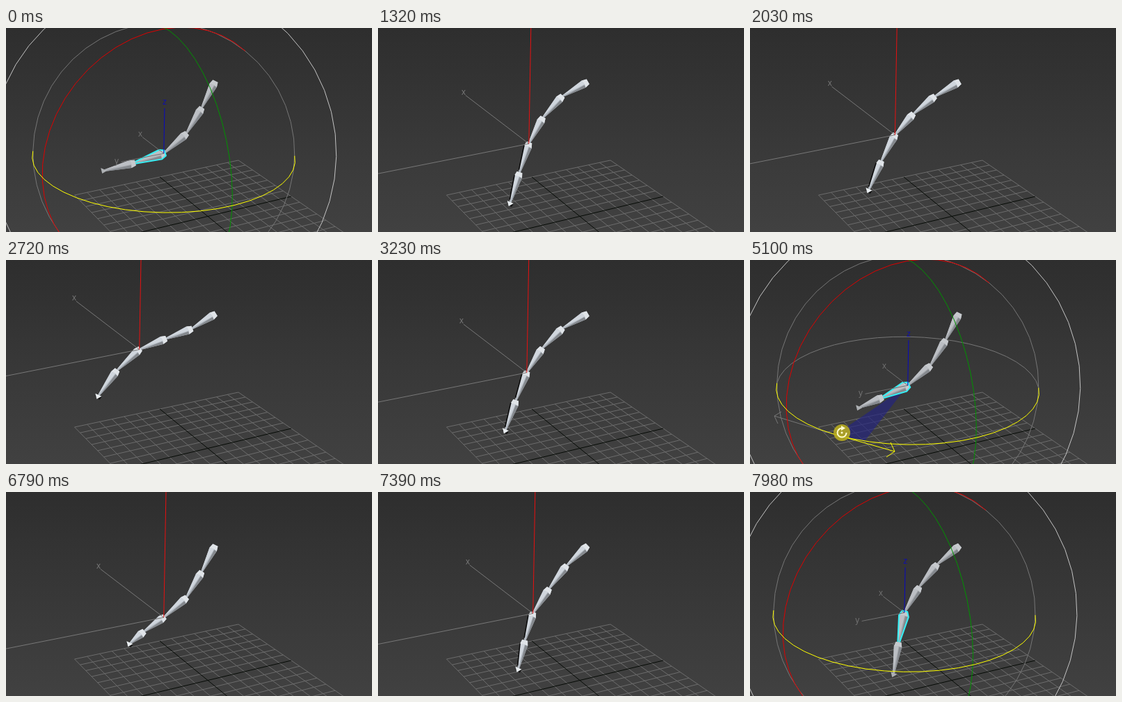
Animation of 526 by 293 pixels, one loop 8000 ms. Source, as an HTML page with a canvas:

```html
<!DOCTYPE html>
<html lang="en">
<head>
<meta charset="utf-8">
<title>Bone chain</title>
<style>
html, body { margin: 0; width: 100%; height: 100%; overflow: hidden; background: #363636; }
canvas { display: block; width: 526px; height: 293px; }
</style>
</head>
<body>
<canvas id="stage" width="526" height="293"></canvas>
<script>
const ctx = document.getElementById('stage').getContext('2d');
const W = 526, H = 293, LOOP = 8000;
const RAD = Math.PI / 180;

const mix = (a, b, k) => Array.isArray(a) ? a.map((v, i) => mix(v, b[i], k)) : a + (b - a) * k;
const within = (t, a, b) => t >= a && t < b;

function sample(steps, t) {
  let i = 0;
  while (i < steps.length - 2 && t >= steps[i + 1][0]) i++;
  const [t0, a] = steps[i], [t1, b] = steps[i + 1];
  return mix(a, b, Math.min(1, Math.max(0, (t - t0) / (t1 - t0))));
}

// Camera: x to the right, y down, depth towards the viewer.
const SIN = 0.408, COS = 0.913, DISTANCE = 1770, ROLL = 0.018;
const level = deg => [Math.cos(deg * RAD), Math.sin(deg * RAD) * SIN, Math.sin(deg * RAD) * COS];
const AXIS = { x: level(241), y: level(152), z: [0, -COS, SIN] };
const RIGHT = [1, 0, 0], DOWN = [0, 1, 0], FRONT = level(90);

function project([ox, oy], [x, y, depth], radius) {
  const scale = radius * DISTANCE / (DISTANCE - depth * radius);
  return [ox + (x - ROLL * y) * scale, oy + (y + ROLL * x) * scale];
}

// Joints run from the fixed root to the tip; the fourth one carries the gizmo.
const ROOT = [300, 78], TAIL = 45, PIVOT = 3;
function chain(reach, ...bearings) {
  const joints = [ROOT];
  bearings.forEach((deg, i) => {
    const [x, y] = joints[i], len = i < PIVOT ? reach : TAIL;
    joints.push([x + len * Math.cos(deg * RAD), y + len * Math.sin(deg * RAD)]);
  });
  return joints;
}

// Turns the tail around the vertical axis through the pivot.
function spin(joints, deg) {
  const [ox, oy] = joints[PIVOT], c = Math.cos(deg * RAD), s = Math.sin(deg * RAD);
  return joints.map(([x, y], i) => {
    if (i <= PIVOT) return [x, y];
    const drop = i === PIVOT + 1 ? 6 : 0;
    const across = x - ox, ahead = (y - oy - drop) / SIN;
    return [ox + across * c + ahead * s, oy + drop + (ahead * c - across * s) * SIN];
  });
}

const REST = chain(42.5, 117, 121, 139, 162, 166);
const HANGING = chain(41.5, 150, 132, 118, 108, 107);
const RAISED = chain(40, 148, 159, 158, 137, 126);
const FINAL = chain(41.5, 140, 128, 120, 101, 99);

const TURN = [[4950, 0], [5100, 13], [5500, 27]];
const POSES = [
  [0, REST], [900, REST], [1320, HANGING], [1720, HANGING], [2650, RAISED], [2720, RAISED],
  [3300, HANGING], [3479, HANGING], [3480, REST],
  ...TURN.map(([t, deg]) => [t, spin(REST, deg)]),
  [6790, spin(REST, 27)], [7510, FINAL]
];
const CURSOR = [[3730, [330, 200]], [3910, [284, 217]], [4670, [132, 248]], [5100, [132, 248]], [5500, [163, 257]]];

function path(points, closed) {
  ctx.beginPath();
  points.forEach(([x, y]) => ctx.lineTo(x, y));
  if (closed) ctx.closePath();
}
function line(points, color, width = 1) {
  path(points);
  ctx.strokeStyle = color;
  ctx.lineWidth = width;
  ctx.stroke();
}
function fill(points, color) {
  path(points, true);
  ctx.fillStyle = color;
  ctx.fill();
}
function disc(x, y, r, color) {
  ctx.beginPath();
  ctx.arc(x, y, r, 0, Math.PI * 2);
  ctx.fillStyle = color;
  ctx.fill();
}

function floorPoint(u, v) {
  const w = 1 + 0.0442 * u - 0.0917 * v;
  return [(290 + 138.1 * u + 48.7 * v) / w, (270.5 - 17.8 * u + 36.9 * v) / w];
}
function drawFloor() {
  const shade = ctx.createLinearGradient(0, 0, 0, H);
  shade.addColorStop(0, '#2e2e2e');
  shade.addColorStop(1, '#414141');
  ctx.fillStyle = shade;
  ctx.fillRect(0, 0, W, H);
  const cells = 7;
  const rule = (k, color) => {
    line([floorPoint(k, -1), floorPoint(k, 1)], color);
    line([floorPoint(-1, k), floorPoint(1, k)], color);
  };
  for (let i = -cells; i <= cells; i++) if (i) rule(i / cells, '#6c6c6c');
  rule(0, '#050a05');
}

function drawBone(a, b, half, selected, dragging) {
  const len = Math.hypot(b[0] - a[0], b[1] - a[1]);
  const ux = (b[0] - a[0]) / len, uy = (b[1] - a[1]) / len;
  const at = (along, side) => [a[0] + ux * along - uy * side, a[1] + uy * along + ux * side];
  const cap = [at(-2, -4), at(-2, 4), at(5, half), at(4, -1), at(5, -half)];
  const tip = [at(len - 1, 1.2), at(len - 1, -1.2)];
  const outline = [at(-2, -4), at(-2, 4), at(5, half), ...tip, at(5, -half)];
  fill(outline, dragging ? '#b4bbc3' : '#a6a9ae');
  fill([at(5, half), tip[0], at(4, -1)], dragging ? '#d0d6dd' : '#bcbfc4');
  fill([at(5, -half), tip[1], at(5, -half * 0.3)], '#85898e');
  fill(cap, dragging ? '#e0e4e8' : '#c6c9cd');
  if (selected) line([...outline, outline[0], outline[1]], '#35f0f5', 2);
  if (dragging && uy > 0.9) line([at(4, half), at(len - 5, 2)], '#080808', 1.5);
}

function drawChain(joints, dragging) {
  for (let i = 0; i < 5; i++) {
    const selected = i === PIVOT && !dragging;
    drawBone(joints[i], joints[i + 1], selected ? 7 : 5.8, selected, dragging);
  }
  const [x, y] = joints[5];
  if (dragging) fill([[x - 5, y - 1], [x + 2, y + 5], [x + 5, y + 1]], '#101010');
  fill([[x - 4, y - 4], [x + 5, y], [x - 2, y + 4]], dragging ? '#e9edf0' : '#aeb1b4');
}

// The part of a circle spanned by a and b that starts at the given angle past its nearest point.
function drawRing(origin, a, b, radius, color, from = -90, sweep = 180) {
  const nearest = Math.atan2(b[2], a[2]), points = [], step = 7.5;
  for (let deg = from; deg <= from + sweep; deg += step) {
    const t = nearest + deg * RAD;
    points.push(project(origin, a.map((v, i) => v * Math.cos(t) + b[i] * Math.sin(t)), radius));
  }
  line(points, color);
}

function drawAxis(origin, name, length, color, labelColor = color) {
  line([origin, project(origin, AXIS[name], length)], color);
  const [x, y] = project(origin, AXIS[name], length + 7);
  ctx.font = '12px "Liberation Sans", Arial, sans-serif';
  ctx.textAlign = 'center';
  ctx.textBaseline = 'middle';
  ctx.fillStyle = labelColor;
  ctx.fillText(name, x, y - 2);
}

const RING = 188;
function drawGizmo(origin) {
  const { x, y, z } = AXIS;
  drawRing(origin, RIGHT, DOWN, 248, '#c4c4c4', 0, 360);
  drawRing(origin, RIGHT, DOWN, RING, '#767676', 0, 360);
  drawRing(origin, y, z, RING, '#e00000');
  drawRing(origin, x, z, RING, '#009400');
  drawRing(origin, RIGHT, FRONT, RING, '#ffff00');
  drawAxis(origin, 'x', 66, '#707070');
  drawAxis(origin, 'y', 68, '#707070');
  drawAxis(origin, 'z', 70, '#0808c0', '#1010a8');
}

function drawTurn(origin, degrees) {
  const grab = 120, rim = deg => project(origin, level(deg), RING);
  drawRing(origin, RIGHT, FRONT, RING, '#767676', 90, 180);
  const wedge = [origin];
  for (let i = 0; i <= 8; i++) wedge.push(rim(grab - degrees * i / 8));
  fill(wedge, 'rgba(36,36,130,0.66)');
  const tail = [35, 224], head = [208, 275];
  const [x, y] = head;
  line([[45, 218], tail, [40, 235]], '#777');
  line([tail, rim(grab)], '#777');
  line([rim(grab), head], '#ffff00');
  line([[x - 6, y - 13], head, [x - 12, y + 8]], '#ffff00');
}

function drawDragAxes(origin) {
  drawAxis(origin, 'x', 208, '#777');
  drawAxis(origin, 'y', 300, '#777');
  drawAxis(origin, 'z', 230, '#e81010');
}

function drawCursor([x, y], pressed) {
  if (pressed) disc(x, y, 12, 'rgba(190,178,30,0.85)');
  const color = pressed ? '#fffbd0' : '#fff';
  ctx.beginPath();
  ctx.arc(x, y, 6.5, 0, Math.PI * 1.5);
  ctx.strokeStyle = color;
  ctx.lineWidth = 2;
  ctx.stroke();
  fill([[x - 1, y - 10], [x + 5, y - 6.5], [x - 1, y - 3]], color);
  disc(x, y, 1.5, color);
}

function draw(t) {
  const dragging = within(t, 900, 3400) || within(t, 6790, 7610);
  const joints = sample(POSES, t), pivot = joints[PIVOT];
  drawFloor();
  if (within(t, 4950, 5680)) drawTurn(pivot, sample(TURN, t));
  drawChain(joints, dragging);
  (dragging ? drawDragAxes : drawGizmo)(pivot);
  if (within(t, 3730, 5920)) drawCursor(sample(CURSOR, t), within(t, 4670, 5680));
}

const start = performance.now();
function tick() {
  draw((performance.now() - start) % LOOP);
  requestAnimationFrame(tick);
}
tick();
</script>
</body>
</html>
```
